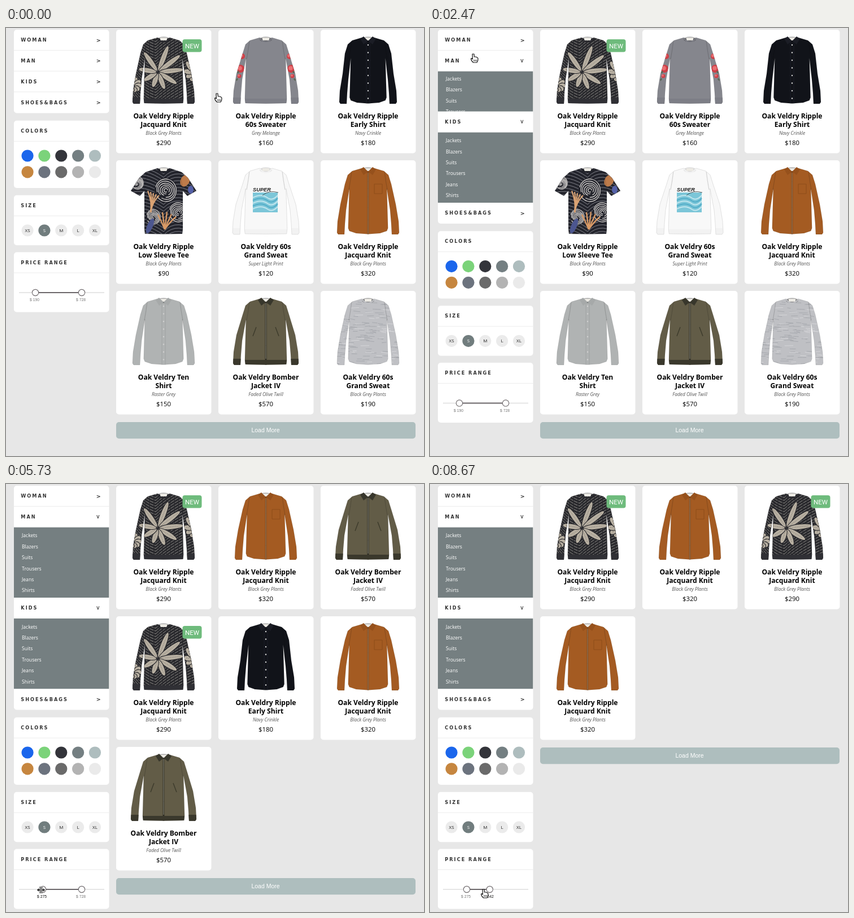
Recreate the animation shown at these times as an HTML page with a canvas. Size 740 by 757 pixels, loop 8.73 s.

```html
<!DOCTYPE html>
<html lang="en">
<head>
<meta charset="utf-8">
<title>Shop filter</title>
<style>
html, body { margin: 0; width: 100%; height: 100%; overflow: hidden; background: #e7e7e7; }
canvas { display: block; width: 740px; height: 757px; }
</style>
</head>
<body>
<canvas id="stage" width="740" height="757"></canvas>
<script>
const ctx = document.getElementById('stage').getContext('2d');
const LOOP = 8730, SUB_H = 124.5, TAU = Math.PI * 2;
const SANS = '"Open Sans", "Noto Sans", sans-serif';
const WIDE = '"DejaVu Sans", Verdana, sans-serif';
const ARIAL = '"Liberation Sans", Arial, sans-serif';

const clamp = v => Math.max(0, Math.min(1, v));
const mix = (a, b, p) => a + (b - a) * p;
const swing = p => 0.5 - Math.cos(clamp(p) * Math.PI) / 2;
const ramp = (t, from, to) => swing((t - from) / (to - from));

function box(x, y, w, h, r, color) {
  ctx.fillStyle = color;
  ctx.beginPath();
  ctx.roundRect(x, y, w, h, r);
  ctx.fill();
}
function oval(x, y, rx, ry, color, turn = 0) {
  ctx.fillStyle = color;
  ctx.beginPath();
  ctx.ellipse(x, y, rx, ry, turn, 0, TAU);
  ctx.fill();
}
function dot(x, y, r, color) { oval(x, y, r, r, color); }
function poly(points, fill) {
  ctx.beginPath();
  points.forEach(([x, y]) => ctx.lineTo(x, y));
  ctx.closePath();
  if (fill) { ctx.fillStyle = fill; ctx.fill(); }
}
function curve(color, width, x1, y1, cx, cy, x2, y2) {
  ctx.strokeStyle = color;
  ctx.lineWidth = width;
  ctx.beginPath();
  ctx.moveTo(x1, y1);
  ctx.quadraticCurveTo(cx, cy, x2, y2);
  ctx.stroke();
}
function line(color, width, x1, y1, x2, y2) { curve(color, width, x1, y1, x1, y1, x2, y2); }
function text(str, x, y, font, color, align = 'left', spacing = 0) {
  ctx.font = font;
  ctx.fillStyle = color;
  ctx.textAlign = align;
  ctx.letterSpacing = spacing + 'px';
  ctx.fillText(str, x, y);
}
function random(seed) {
  return () => (seed = (seed * 16807) % 2147483647) / 2147483647;
}

// Garments: origin is the top centre of a card

function outline({ w, rib, short }) {
  const body = short ? 34 : w * 0.64;
  const sleeve = short
    ? [[32, 21], [43, 31], [58, 54], [42, 63], [34, 54]]
    : [[28, 19], [36, 26], [41, 42], [w - 6, 78], [w - 1, 108], [w, 128], [w - 2, 131],
       [w - 13, 131], [w - 14, 112], [w - 16, 88], [body - 2, 50]];
  const bottom = rib || short
    ? [[body, 122], [body - 1, 130]]
    : [[body, 120], [body - 2, 125], [body * 0.6, 129]];
  const half = [[11, 14], ...sleeve, ...bottom];
  const left = half.map(([x, y]) => [-x, y]).reverse();
  return [[0, 19], ...half, [0, 130.5], ...left];
}
function flower(x, y, size) {
  for (const a of [-1.2, -0.65, -0.1, 0.55, 1.2, 1.9, 2.6, 3.3, 4.1]) {
    const len = size * (0.85 + 0.25 * Math.cos(a + 1));
    ctx.save();
    ctx.translate(x, y);
    ctx.rotate(a);
    oval(len / 2 + 2, 0, len / 2, 5.4, '#26262a');
    oval(len / 2 + 2, 0, len / 2 - 1, 4.2, '#b8b0a2');
    ctx.setLineDash([1, 2]);
    line('#57534e', 0.8, 4, 0, len - 4, 0);
    ctx.restore();
  }
}
function knitArt() {
  ctx.setLineDash([7, 1.5]);
  for (let i = 0; i < 36; i++) {
    const y = i * 5 - 16;
    curve('#8f8d89', 1, -60, y - 28, -40, y + 4, -14, y + 12);
    curve('#8f8d89', 1, -14, y + 12, 16, y - 16, 60, y - 34);
  }
  ctx.setLineDash([]);
  flower(-10, 75, 44);
  flower(54, 76, 24);
  flower(-54, 100, 14);
}
function teeArt() {
  for (let i = 0; i < 28; i++) {
    const y = i * 6;
    curve('#9a9ba2', 0.8, -60, y - 14, -34, y - 24, 0, y);
    curve('#9a9ba2', 0.8, 0, y, 25, y - 26, 60, y + 4);
  }
  for (const [x, y, r] of [[4, 53, 20], [-18, 100, 13], [26, 92, 17], [-46, 40, 11]]) {
    oval(x, y, r, r * 1.1, '#23242c');
    for (let k = 1; k < 7; k++) {
      ctx.strokeStyle = '#cfccca';
      ctx.lineWidth = 1.3;
      ctx.beginPath();
      ctx.ellipse(x, y, r * k / 6.5, r * k / 6, k * 0.5, 0.4, 5.9);
      ctx.stroke();
    }
  }
  oval(38, 36, 8, 11, '#bd7b4a', 0.5);
  oval(48, 52, 5, 7, '#5561a8');
  oval(-24, 116, 5, 14, '#4c568f', 0.4);
  for (let k = 0; k < 5; k++) {
    curve('#d99a66', 2.4, 2, 122, -4 + k * 4, 108, -10 + k * 8, 96 - 5 * Math.sin(k));
    curve('#dba373', 2.2, -23, 92, -20, 74, -28 + k * 5, 54 + k * 2);
  }
}
function roseArt() {
  for (const s of [-1, 1]) {
    for (const [x, y, r] of [[42, 47, 5], [45, 69, 7], [47, 82, 3.5]]) {
      dot(s * x, y, r, '#cf3e46');
      dot(s * x - 1, y - 1, r * 0.55, '#ea6f72');
      oval(s * (x + 4), y + 6, 2.5, 1.5, '#5d6a58', s);
    }
  }
}
function printArt() {
  text('SUPER', -23, 55, 'italic bold 9.3px ' + ARIAL, '#222');
  box(-23, 57, 44, 35, 0, '#7cc6d8');
  for (let i = 0; i < 5; i++) {
    const y = 66 + i * 5;
    curve(i % 2 ? '#52adc8' : '#c2e6ee', 2, -23, y, -8, y - 8, 4, y + 1);
    curve(i % 2 ? '#52adc8' : '#c2e6ee', 2, 4, y + 1, 12, y + 6, 21, y - 4);
  }
  curve('#333', 0.8, -6, 62, 6, 52, 22, 57);
}
function buttons(color, seam) {
  line(seam, 0.8, -3, 22, -3, 131);
  line(seam, 0.8, 3, 22, 3, 131);
  for (let y = 27; y < 128; y += 13.5) dot(0, y, 1.2, color);
}
function zipArt() {
  line('#6b3a12', 2.5, 0, 22, 0, 131);
  line('#c9b49a', 0.7, 0, 22, 0, 131);
  ctx.strokeStyle = '#8a4a17';
  ctx.lineWidth = 0.8;
  ctx.strokeRect(11, 42, 14, 17);
}
function bomberArt() {
  line('#2f2d24', 3, 0, 20, 0, 131);
  line('#a9a698', 0.8, 0, 20, 0, 120);
  for (const s of [-1, 1]) line('#3c3a2b', 1.4, s * 17, 64, s * 23, 80);
}
function melangeArt() {
  const rnd = random(77);
  for (let i = 0; i < 170; i++) {
    const x = rnd() * 116 - 62, y = 16 + rnd() * 116;
    line(i % 3 ? '#a3a5ab' : '#d8d9dc', 0.9, x, y, x + 6 + rnd() * 10, y + rnd() * 3 - 1);
  }
}

const LOOKS = {
  knit: { w: 55, color: '#29292d', rib: '#303035', art: knitArt },
  rose: { w: 58, color: '#85868d', rib: '#7d7e86', art: roseArt },
  navy: { w: 51, color: '#111319', collar: '#1b1d25', art: () => buttons('#d8d8d8', '#20222b') },
  tee: { w: 58, color: '#23242c', short: true, art: teeArt },
  print: { w: 59, color: '#f8f8f8', rib: '#f2f2f2', edge: '#dadada', art: printArt },
  suede: { w: 55, color: '#a45b22', collar: '#96511c', art: zipArt },
  grey: { w: 55, color: '#b0b3b3', collar: '#a6a9a9', art: () => buttons('#d0d0d0', '#9da0a0') },
  bomber: { w: 58, color: '#625c47', rib: '#3a382c', collar: '#38372c', art: bomberArt },
  melange: { w: 55, color: '#bfc0c4', art: melangeArt }
};

function garment(x, y, g) {
  ctx.save();
  ctx.translate(x, y);
  ctx.lineJoin = 'round';
  const points = outline(g);
  ctx.save();
  poly(points, g.color);
  ctx.clip();
  g.art();
  if (g.rib) {
    box(-39, 122, 78, 10, 0, g.rib);
    box(g.w - 15, 120, 17, 13, 0, g.rib);
    box(-g.w - 2, 120, 17, 13, 0, g.rib);
  }
  for (const s of [-1, 1]) curve('rgba(0,0,0,.16)', 1.2, s * 29, 19, s * 31, 36, s * 34, 52);
  ctx.restore();
  poly(points);
  ctx.strokeStyle = g.edge || 'rgba(0,0,0,.12)';
  ctx.lineWidth = 0.8;
  ctx.stroke();
  oval(0, 17, 11, 4.5, g.edge || 'rgba(0,0,0,.35)');
  box(-6, 14, 12, 5, 1, '#eceae4');
  if (g.collar) {
    for (const s of [-1, 1]) poly([[s * 8, 12], [s * 14, 16], [s * 8, 26], [0, 20]], g.collar);
  } else {
    curve(g.rib || g.edge || g.color, 2.5, -11, 15, 0, 28, 11, 15);
  }
  ctx.restore();
}

// Product cards

const BRAND = 'Oak Veldry';
const ITEMS = {
  knit: [BRAND + ' Ripple', 'Jacquard Knit', 'Black Grey Plants', 290],
  rose: [BRAND + ' Ripple', '60s Sweater', 'Grey Melange', 160],
  navy: [BRAND + ' Ripple', 'Early Shirt', 'Navy Crinkle', 180],
  tee: [BRAND + ' Ripple', 'Low Sleeve Tee', 'Black Grey Plants', 90],
  print: [BRAND + ' 60s', 'Grand Sweat', 'Super Light Print', 120],
  suede: [BRAND + ' Ripple', 'Jacquard Knit', 'Black Grey Plants', 320],
  grey: [BRAND + ' Ten', 'Shirt', 'Raster Grey', 150],
  bomber: [BRAND + ' Bomber', 'Jacket IV', 'Faded Olive Twill', 570],
  melange: [BRAND + ' 60s', 'Grand Sweat', 'Black Grey Plants', 190]
};
const GRIDS = [
  ['knit', 'rose', 'navy', 'tee', 'print', 'suede', 'grey', 'bomber', 'melange'],
  ['knit', 'suede', 'bomber', 'knit', 'navy', 'suede', 'bomber'],
  ['knit', 'suede', 'knit', 'suede']
];

function card(key, x, y) {
  const [top, bottom, note, price] = ITEMS[key], cx = x + 84;
  box(x, y, 168.5, 218.5, 5, '#fff');
  garment(cx, y, LOOKS[key]);
  const bold = 'bold 12.1px ' + SANS;
  text(top, cx, y + 157.3, bold, '#000', 'center');
  text(bottom, cx, y + 171.5, bold, '#000', 'center');
  text(note, cx, y + 185.6, 'italic 8.4px ' + SANS, '#555', 'center');
  text('$' + price, cx, y + 204.2, '11.4px ' + SANS, '#000', 'center');
  if (key === 'knit') {
    box(x + 117.5, y + 17, 34, 22.5, 4, '#6ebb7c');
    text('NEW', x + 134.5, y + 32.5, '11.6px Roboto, ' + ARIAL, '#fff', 'center');
  }
}
function grid(t) {
  const keys = GRIDS[t < 5450 ? 0 : t < 8350 ? 1 : 2];
  keys.forEach((key, i) => card(key, 195 + 181 * (i % 3), 3 + 231 * Math.floor(i / 3)));
  const y = 3 + 231 * Math.ceil(keys.length / 3) + 1;
  const hover = ramp(t, 6050, 6300) - ramp(t, 6730, 7000);
  box(195, y, 530, 29.3, 5, `rgb(${mix(174, 171, hover)},${mix(190, 181, hover)},${mix(190, 183, hover)})`);
  text('Load More', 459.5, y + 18.3, '10.5px ' + ARIAL, '#fff', 'center');
}

// Sidebar

const HEAD = 'bold 8.2px ' + WIDE;
const LINKS = ['Jackets', 'Blazers', 'Suits', 'Trousers', 'Jeans', 'Shirts'];
const SWATCHES = ['#1b66ec', '#7bd37a', '#33343a', '#747f82', '#aebdbe',
                  '#c6863f', '#6c737e', '#6a6a6a', '#b3b3b3', '#eaeaea'];
const column = i => 38.1 + 29.85 * i;

function heading(label, y) { text(label, 26.3, y + 21.2, HEAD, '#333', 'left', 2); }
function panel(label, y, h) {
  box(14, y, 168.5, h, 5, '#fff');
  box(14, y + 36, 168.5, 1, 0, '#ececec');
  heading(label, y);
}
function submenu(y, open) {
  const h = SUB_H * open;
  ctx.save();
  ctx.beginPath();
  ctx.rect(14, y, 168.5, h);
  ctx.clip();
  box(14, y, 168.5, h, 0, '#757f81');
  LINKS.forEach((s, i) => text(s, 28, y + 14.2 + 3.5 * open + 19.4 * i, '8.6px ' + SANS, '#fff'));
  ctx.restore();
  return h;
}
function menu(t) {
  const opened = {
    MAN: { at: 2270, p: ramp(t, 2302, 2612) },
    KIDS: { at: 1070, p: ramp(t, 1070, 1380) }
  };
  const extra = SUB_H * (opened.MAN.p + opened.KIDS.p);
  box(14, 3, 168.5, 147.5 + extra, 5, '#fff');
  let y = 3;
  ['WOMAN', 'MAN', 'KIDS', 'SHOES&BAGS'].forEach((label, i) => {
    const sub = opened[label];
    heading(label, y);
    ctx.save();
    ctx.translate(163.7, y + 18.2);
    if (sub && t >= sub.at) ctx.rotate(Math.PI / 2);
    text('>', 0, 3.4, 'bold 9.5px ' + WIDE, '#333', 'center');
    ctx.restore();
    if (i < 3) box(14, y + 36, 168.5, 1, 0, '#ececec');
    y += 36.8;
    if (sub) y += submenu(y, sub.p);
  });
  return extra;
}
function slider(y, t) {
  const knobs = [
    { x: mix(52, 65, ramp(t, 4950, 5430)), hot: t > 4700 && t < 5800 },
    { x: mix(134, 105.7, ramp(t, 7870, 8330)), hot: t > 7700 }
  ];
  box(23, y - 0.8, 151, 1.6, 0, '#dedede');
  box(knobs[0].x, y - 1, knobs[1].x - knobs[0].x, 2, 0, '#6c676a');
  for (const { x, hot } of knobs) {
    dot(x, y, 6.2, '#6c676a');
    dot(x, y, 5.1, '#fff');
    const price = Math.round(190 + (x - 52) * 538 / 82);
    text('$ ' + price, x - 1.5, y + 15.3, '6.8px ' + ARIAL, hot ? '#111' : '#777', 'center');
  }
}
function sidebar(t) {
  const d = menu(t);
  panel('COLORS', 163.7 + d, 119.3);
  SWATCHES.forEach((c, i) => dot(column(i % 5), 226 + d + (i > 4 ? 28.8 : 0), 10.6, c));
  panel('SIZE', 295.7 + d, 88.5);
  ['XS', 'S', 'M', 'L', 'XL'].forEach((s, i) => {
    const on = s === 'S';
    dot(column(i), 358 + d, 10.6, on ? '#717d7e' : '#ebebeb');
    text(s, column(i), 360.9 + d, '8px ' + SANS, on ? '#fff' : '#222', 'center');
  });
  panel('PRICE RANGE', 396.5 + d, 106);
  slider(468 + d, t);
}

// Pointer: [time, x, y, kind]

const PATH = [
  [0, 374, 116, 'hand'], [70, 374, 116, 'hand'], [730, 78, 91, 'hand'],
  [1070, 78, 90, 'arrow'], [1600, 78, 90, 'arrow'], [1930, 78, 58, 'arrow'],
  [2070, 78, 53, 'arrow'], [2270, 77, 46, 'hand'], [2700, 77, 46, 'hand'],
  [3130, 90, 119, 'arrow'], [3200, 90, 119, 'arrow'], [3600, 99, 465, 'arrow'],
  [4070, 60, 718, 'hand'], [4670, 49, 718, 'resize'], [4950, 49, 718, 'resize'],
  [5430, 62, 718, 'resize'], [5800, 62, 718, 'hand'], [6100, 230, 712, 'hand'],
  [6470, 271, 247, 'hand'], [6740, 271, 247, 'hand'], [7000, 205, 708, 'hand'],
  [7270, 128, 726, 'hand'], [7670, 127, 717, 'hand'], [7870, 127, 717, 'hand'],
  [8330, 99, 717, 'hand'], [8670, 95, 717, 'hand'], [LOOP, 95, 717, 'hand']
];
const HAND = [[-2, 0], [1, 0], [1.4, 5], [4, 5], [7, 6.3], [8, 8], [7.7, 11.5], [6, 15],
              [-0.5, 15], [-3.5, 11.5], [-4.5, 8.3], [-3.2, 7.6], [-1.6, 9]];
const ARROW = [[0, 0], [0, 12], [2.8, 9.4], [5, 14], [7, 13], [5, 8.8], [8.6, 8.6]];

function pointer(t) {
  let i = PATH.length - 2;
  while (i && PATH[i][0] > t) i--;
  const a = PATH[i], b = PATH[i + 1], p = ramp(t, a[0], b[0]);
  ctx.save();
  ctx.translate(mix(a[1], b[1], p), mix(a[2], b[2], p));
  ctx.lineJoin = 'round';
  if (a[3] === 'hand') {
    poly(HAND, '#fff');
    ctx.strokeStyle = '#111';
    ctx.lineWidth = 1.2;
    ctx.stroke();
    for (const x of [0.8, 3, 5.2]) line('#111', 0.9, x, 10, x, 13);
  } else if (a[3] === 'arrow') {
    poly(ARROW);
    ctx.strokeStyle = '#fff';
    ctx.lineWidth = 2;
    ctx.stroke();
    poly(ARROW, '#111');
  } else {
    box(-3, -6.5, 6, 13, 0, '#fff');
    for (const s of [-1, 1]) {
      box(s * 1.5 - 0.7, -6, 1.4, 12, 0, '#111');
      poly([[s * 7, 0], [s * 4, -3], [s * 4, 3]], '#111');
      line('#111', 1.4, s * 2, 0, s * 5, 0);
    }
  }
  ctx.restore();
}

const start = performance.now();
function draw() {
  const t = (performance.now() - start) % LOOP;
  box(0, 0, 740, 757, 0, '#e7e7e7');
  sidebar(t);
  grid(t);
  pointer(t);
  requestAnimationFrame(draw);
}
draw();
</script>
</body>
</html>
```
